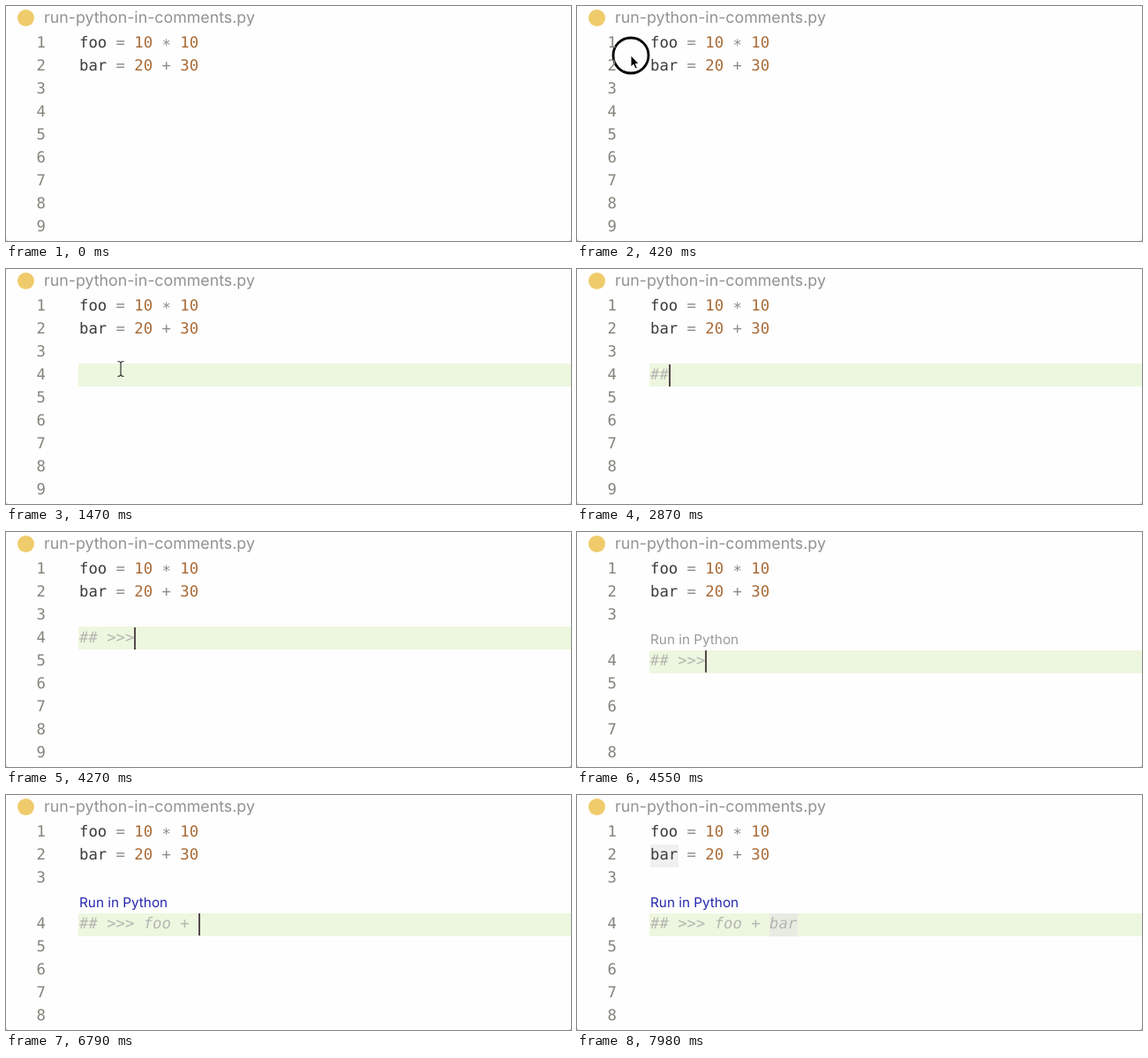
Recreate the animation shown at these times as an HTML page. Size 640x266 px, loop 8000 ms.

```html
<!DOCTYPE html>
<html lang="en">
<head>
<meta charset="utf-8">
<title>Run Python in comments</title>
<style>
  html, body { margin: 0; width: 100%; height: 100%; overflow: hidden; background: #d4d4d4; }
  #editor {
    position: absolute; inset: 0; overflow: hidden;
    background: #fefefe; border-radius: 0 0 4px 4px;
    font: 17.25px/26px "DejaVu Sans Mono", monospace;
    text-rendering: geometricPrecision; white-space: pre; color: #3c3c3c;
  }
  #editor > * { position: absolute; }
  #icon { left: 13px; top: 4px; width: 19px; height: 19px; border-radius: 50%; background: #efcb6b; }
  #title { left: 43px; top: 1px; font: 17.8px/26px Inter, sans-serif; color: #929292; }
  .row { left: 83px; }
  .num { left: 34.6px; color: #83857b; }
  .row i { font-style: normal; color: #8c8c8c; }
  .row b { font-weight: normal; color: #a96a35; }
  .row .star { position: relative; top: 3px; }
  #band { left: 82px; right: 0; height: 26px; background: #edf7df; }
  #lens { left: 83px; top: 109px; font: 15.3px/26px Inter, sans-serif; color: #999; }
  #lens.hover { color: #2426ad; }
  #typed { font-style: italic; color: #b4b6b1; }
  #caret { width: 2px; height: 25px; background: #54494b; }
  .mark { width: 32px; height: 26px; background: #f0f0f2; }
  #mark2 { background: #e7ece3; }
  #pointer, #beam { left: 0; top: 0; overflow: visible; }
</style>
</head>
<body>
<div id="editor">
  <div id="icon"></div>
  <div id="title">run-python-in-comments.py</div>
  <div id="band"></div>
  <div id="mark1" class="mark" style="left:83px;top:56px"></div>
  <div id="mark2" class="mark" style="left:218px;top:134px"></div>
  <div class="row" style="top:29.3px">foo <i>=</i> <b>10</b> <i class="star">*</i> <b>10</b></div>
  <div class="row" style="top:55.2px">bar <i>=</i> <b>20</b> <i>+</i> <b>30</b></div>
  <div id="lens">Run in Python</div>
  <div id="typed" class="row"></div>
  <div id="caret"></div>
  <svg id="beam" width="10" height="20">
    <path d="M126.5 104.5q3.5 0 3.5 2.5q0-2.5 3.5-2.5M130 107v12M126.5 121.5q3.5 0 3.5-2.5q0 2.5 3.5 2.5" fill="none" stroke="#333" stroke-width="1.2"/>
  </svg>
  <svg id="pointer" width="44" height="44">
    <circle r="20" fill="none" stroke="#000" stroke-width="2.8"/>
    <path d="M0 0V13L3 10.3L5.1 15L7.3 14L5.3 9.5H9.2Z" fill="#000" stroke="#fff" stroke-width="1"/>
  </svg>
</div>
<script>
const LOOP = 8000, STEP = 70, CHAR = 10.385, LEFT = 83, PITCH = 25.9;
const CLICK = 910, LENS = 4550, HOVER = 4760, MARKS = 7770;
const LINE = '## >>> foo + bar';

// [time, characters typed, caret visible]
const TYPING = [
  [CLICK, 0, 1], [1470, 0, 0], [1960, 0, 1], [2520, 0, 0],
  [2660, 1, 1], [2870, 2, 1], [3360, 3, 1], [3850, 3, 0],
  [3990, 4, 1], [4130, 5, 1], [4270, 6, 1], [4760, 6, 0],
  [5040, 7, 1], [5250, 8, 1], [5530, 9, 1], [5670, 10, 1],
  [5950, 11, 1], [6440, 11, 0], [6510, 12, 1], [6790, 13, 1],
  [7070, 14, 1], [7350, 15, 1], [7490, 16, 1], [7980, 16, 0]
];
// [time, x, y]
const PATH = [[70, 300, 262], [420, 61, 56], [840, 130, 112]];

const $ = id => document.getElementById(id);
const show = (id, on) => { $(id).style.visibility = on ? 'visible' : 'hidden'; };
const ease = k => k * k * (3 - 2 * k);

const nums = Array.from({ length: 9 }, (_, i) => {
  const el = document.createElement('div');
  el.className = 'num';
  el.textContent = i + 1;
  $('editor').append(el);
  return el;
});

function pointerAt(t) {
  const i = t < PATH[1][0] ? 0 : 1;
  const [t0, x0, y0] = PATH[i], [t1, x1, y1] = PATH[i + 1];
  const k = ease(Math.min(1, Math.max(0, (t - t0) / (t1 - t0))));
  return [x0 + (x1 - x0) * k, y0 + (y1 - y0) * k];
}

function draw(t) {
  const lens = t >= LENS;
  nums.forEach((el, i) => {
    el.style.top = 29.3 + PITCH * (i + (lens && i > 2 ? 1 : 0)) + 'px';
  });

  const moving = t >= STEP && t < CLICK;
  show('pointer', moving);
  if (moving) {
    const [x, y] = pointerAt(Math.floor(t / STEP) * STEP);
    $('pointer').style.transform = `translate(${x}px, ${y}px)`;
  }

  const [, count, caret] = TYPING.findLast(s => s[0] <= t) || [0, 0, 0];
  const top = lens ? 134 : 107;
  $('typed').textContent = LINE.slice(0, count);
  $('typed').style.top = (lens ? 133 : 107) + 'px';
  $('band').style.top = top + 'px';
  $('caret').style.top = (lens ? 134 : 108) + 'px';
  $('caret').style.left = LEFT + count * CHAR + 'px';

  show('band', t >= CLICK);
  show('caret', caret);
  show('beam', t >= CLICK && count === 0);
  show('lens', lens);
  $('lens').classList.toggle('hover', t >= HOVER);
  show('mark1', t >= MARKS);
  show('mark2', t >= MARKS);
}

function tick() {
  draw(performance.now() % LOOP);
  requestAnimationFrame(tick);
}
tick();
</script>
</body>
</html>
```
